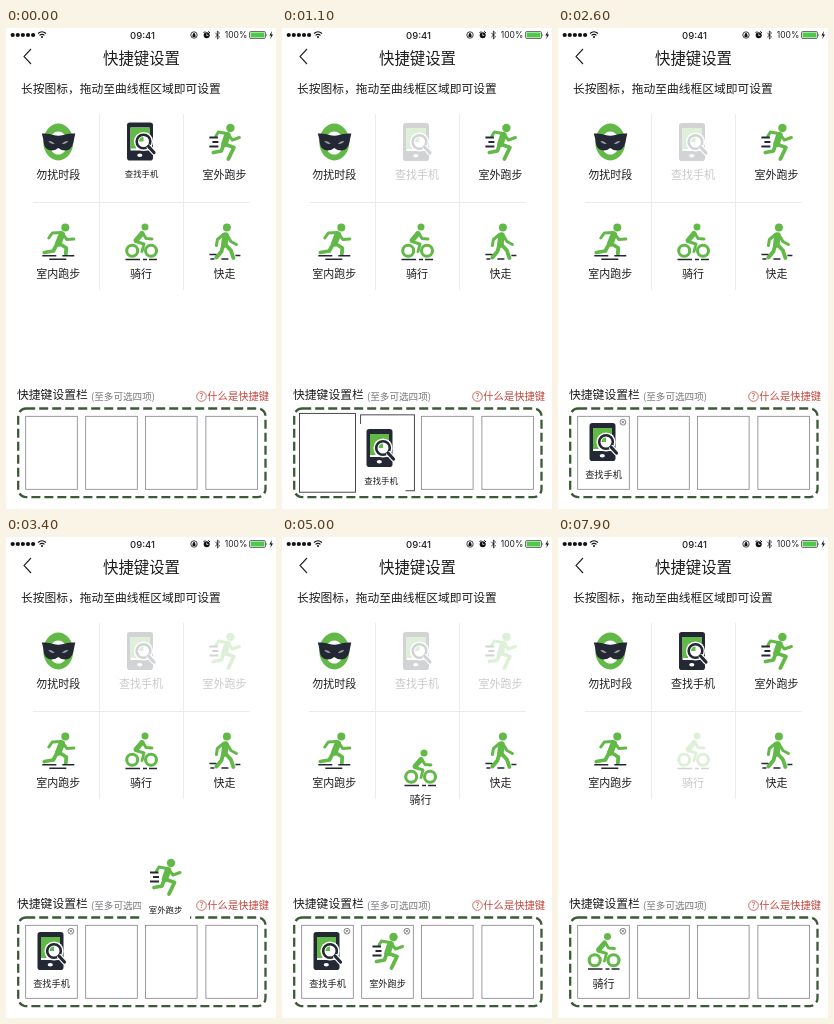
An HTML page that plays this animation: 270x481 px, repeating every 8000 ms.

```html
<!DOCTYPE html>
<html lang="zh-CN">
<head>
<meta charset="utf-8">
<title>快捷键设置</title>
<style>
html, body { margin: 0; width: 100%; height: 100%; overflow: hidden; background: #fff; }
svg { display: block; width: 100vw; height: 100vh; }
text { font-family: "Noto Sans CJK SC", "Noto Sans CJK", "Noto Sans", sans-serif; fill: #1d1d1f; }
.status { font-family: Inter, Roboto, sans-serif; }
.g { fill: #63b947; }
.d { fill: #242835; }
.w { fill: #fff; }
.gs, .ds, .ws { fill: none; stroke-linecap: round; stroke-linejoin: round; }
.gs { stroke: #63b947; }
.ds { stroke: #242835; }
.ws { stroke: #fff; }
.flat { stroke-linecap: butt; }
.faded .icon { opacity: .2; }
.faded text { fill: #c9c9c9; }
.slot { fill: none; stroke: #80808a; stroke-width: .8; }
.slot.over { stroke: #33363c; stroke-width: .9; }
</style>
</head>
<body>
<svg viewBox="0 0 270 481" preserveAspectRatio="none">
  <defs>
    <g id="mask">
      <ellipse class="g" rx="15" ry="18.500"/>
      <ellipse class="w" cy="1" rx="9" ry="11.500"/>
      <path class="d" d="M-16.500-8.500Q-9-9-5-7Q0-5.500 5-7Q9-9 17-8.500Q16-4 15 1Q13 8.500 7 8.500Q3 8.500 0 6Q-3 8.500-7 8.500Q-14 7.500-14.500 1Q-15-4-16.500-8.500Z"/>
      <path class="w" opacity=".55" d="M-10-1Q-6-1.500-3.500 2Q-8 2.500-10-1ZM10-1Q6-1.500 3.500 2Q8 2.500 10-1Z"/>
    </g>
    <g id="phone">
      <rect class="d" x="-14" y="-19" width="26" height="38" rx="2.800"/>
      <rect class="w" x="-10.500" y="-14" width="19" height="23"/>
      <path class="g" d="M-10.500-14H8.500V-8H-5V7H-10.500Z"/>
      <rect class="g" x="-8" y="-11" width="13" height="16"/>
      <circle class="w" cx="2.500" cy="0" r="9.600"/>
      <circle class="ds" cx="2.500" cy="0" r="6.800" stroke-width="2.600"/>
      <path class="g" d="M2.500-4.500A4.500 4.500 0 0 0-2 0H2.500Z"/>
      <path class="ws" d="M8.500 6L13 11" stroke-width="5.500"/>
      <path class="ds" d="M7.500 5L13 11" stroke-width="3.200"/>
      <ellipse class="w" cx="-1.200" cy="13.800" rx="2.600" ry="1.700"/>
    </g>
    <g id="outdoor">
      <circle class="g" cx="6" cy="-14" r="4.200"/>
      <path class="gs" d="M3-7L0 2" stroke-width="6.500"/>
      <path class="gs" d="M2-8.500L-6-10L-8.500-6M4-7L8-2L15-4.500" stroke-width="3"/>
      <path class="gs" d="M0 2L9.500 5.500L4 17M-1 3L-3 9L-11 10.500" stroke-width="3.800"/>
      <path class="ds flat" d="M-15-4.500H-6.500M-12 0H-6M-15 4.500H-6" stroke-width="1.900"/>
    </g>
    <g id="indoor">
      <circle class="g" cx="7" cy="-14" r="4"/>
      <path class="gs" d="M3.500-7L0 2" stroke-width="6.500"/>
      <path class="gs" d="M3-9L-6-8.500L-9.500-3.500M5-7L8.500-2L15.500-2.500" stroke-width="3"/>
      <path class="gs" d="M1 2L8 6.500L7.500 12.500M-1 2L-5 9.500L-14 11" stroke-width="3.800"/>
      <path class="ds flat" d="M-16 14.300H-2M4 14.300H16M-9 17.700H8" stroke-width="1.600"/>
    </g>
    <g id="bike">
      <circle class="gs" cx="-8.800" cy="9.300" r="5.500" stroke-width="3.100"/>
      <circle class="gs" cx="10" cy="9.300" r="5.500" stroke-width="3.100"/>
      <circle class="g" cx="4" cy="-14.500" r="3.500"/>
      <path class="gs" d="M1-8L-5-1" stroke-width="5"/>
      <path class="gs" d="M2-8L5-3L11-2.500M-5 0L3 2.500L1 10" stroke-width="2.900"/>
      <path class="ds flat" d="M-15.500 18H-1M2 18H6M8 18H16" stroke-width="1.600"/>
    </g>
    <g id="walk">
      <circle class="g" cx="2.500" cy="-14" r="4"/>
      <path class="gs" d="M1-6L0 3" stroke-width="6.500"/>
      <path class="gs" d="M-1-7L-7-2L-8 4M3-6L6.500 0L12 3" stroke-width="3"/>
      <path class="gs" d="M1 3L6.500 9L9 16.500M-1 3L-3 10L-8 16" stroke-width="3.900"/>
      <path class="ds flat" d="M-15 13H-8M-14 17.500H-10M-3 17.500H4M11 14H16" stroke-width="1.600"/>
    </g>
  </defs>
  <rect width="270" height="481" fill="#fff"/>

  <g id="bar" fill="#111">
    <path d="M32 5.500Q36 2 40 5.500M33.500 7.400Q36 5.300 38.500 7.400" fill="none" stroke="#111" stroke-width="1.100"/>
    <circle cx="36" cy="9" r="1"/>
    <circle cx="188" cy="7" r="3.200" fill="none" stroke="#111" stroke-width=".8"/>
    <path d="M186.500 6.500H189.500V9H186.500ZM187 6.500V5.300H189V6.500"/>
    <circle cx="200.700" cy="7.300" r="3"/>
    <path d="M197.500 5L199.200 3.300M204 5L202.200 3.300" stroke="#111" stroke-width="1"/>
    <path d="M200.700 5.500V7.500H202.300" fill="none" stroke="#fff" stroke-width=".7"/>
    <path d="M209.300 4.800L213.500 9L211.400 11V3L213.500 5L209.300 9.200" fill="none" stroke="#111" stroke-width=".8"/>
    <rect x="243.500" y="3.500" width="16" height="7" rx="1.500" fill="#fff" stroke="#333" stroke-width=".7"/>
    <rect x="244.600" y="4.600" width="13.800" height="4.800" rx=".6" fill="#4fc94c"/>
    <path d="M260.500 5.700V8.300Q261.800 7 260.500 5.700Z"/>
    <path d="M266 3L263.300 7.500H265L264.300 11L267 6.500H265.300Z"/>
  </g>
  <path d="M25 21L18 28.500L25 36" fill="none" stroke="#222" stroke-width="1.100"/>
  <path d="M93.500 86V262M177.500 86V262M27 174.500H244" stroke="#ebebeb" fill="none"/>
  <g id="copy"></g>
  <g id="grid"></g>
  <rect x="12.200" y="380.500" width="247.300" height="88.600" rx="8" fill="none" stroke="#3c5a37" stroke-width="2.300" stroke-dasharray="9 4"/>
  <circle cx="195.500" cy="368.500" r="4.800" fill="none" stroke="#c4473d" stroke-width=".8"/>
  <g id="slots"></g>
  <g id="tray"></g>
  <g id="drag"></g>
</svg>
<script>
const LOOP = 8000, STEP = 100;
const NS = "http://www.w3.org/2000/svg";
const $ = id => document.getElementById(id);

function add(parent, tag, attrs = {}) {
  const el = document.createElementNS(NS, tag);
  for (const k in attrs) el.setAttribute(k, attrs[k]);
  return parent.appendChild(el);
}
// y is the middle of the line
function label(parent, str, x, y, size, anchor = "middle", extra = {}) {
  const el = add(parent, "text", { x, y: y + size * .37, "font-size": size, "text-anchor": anchor, ...extra });
  el.textContent = str;
  return el;
}
function place(el, x, y) { el.setAttribute("transform", `translate(${x} ${y})`); }
function show(el, on) { el.style.display = on ? "" : "none"; }
function icon(parent, id) { return add(parent, "use", { href: "#" + id, class: "icon" }); }

const items = [
  { id: "mask", name: "勿扰时段", x: 52.3, y: 114 },
  { id: "phone", name: "查找手机", x: 135, y: 114 },
  { id: "outdoor", name: "室外跑步", x: 218.4, y: 114 },
  { id: "indoor", name: "室内跑步", x: 52.3, y: 213.5 },
  { id: "bike", name: "骑行", x: 135, y: 213.5 },
  { id: "walk", name: "快走", x: 218.4, y: 213.5 }
];
const slotX = [45.5, 105.5, 165.3, 225.7];

// drag paths: [time, x, y]; the last entry is the drop
const drags = {
  phone: [[0, 135, 113.5], [300, 128, 165], [600, 82, 335], [800, 52, 412], [1000, 82, 420],
    [1100, 98.5, 420], [1500, 106, 422], [2000, 120.5, 425], [2400, 155, 424], [2600, 162, 422]],
  outdoor: [[2800, 218, 114], [3000, 212, 145], [3200, 186, 245], [3400, 159, 340], [3600, 150, 436],
    [3800, 136, 442], [4000, 114, 428], [4200, 106, 418]],
  bike: [[4700, 135, 213.5], [5000, 138, 230.5], [5300, 146, 305], [5600, 157, 390],
    [5900, 166, 424], [6200, 166, 416]]
};
const removed = { phone: 6900, outdoor: 7500, bike: LOOP };
// slot, from, to
const hovers = [[0, 800, 1300], [1, 1100, 2200], [2, 2200, 2600], [1, 3900, 4200], [2, 5800, 6200]];

const bar = $("bar"), copy = $("copy");
for (let i = 0; i < 5; i++) add(bar, "circle", { cx: 6.7 + i * 5.1, cy: 7, r: 2.1 });
label(bar, "09:41", 136.5, 7, 9.5, "middle", { class: "status", "font-weight": 500 });
label(bar, "100%", 230, 7, 8.5, "middle", { class: "status" });
label(copy, "快捷键设置", 135.5, 30, 15.4);
label(copy, "长按图标，拖动至曲线框区域即可设置", 15, 60.5, 11.75, "start");
label(copy, "快捷键设置栏", 11, 366.7, 11.8, "start");
label(copy, "(至多可选四项)", 85, 368, 9.6, "start", { style: "fill:#77777c" });
label(copy, "什么是快捷键", 201.3, 368.6, 10.3, "start", { style: "fill:#c4473d" });
label(copy, "?", 195.5, 368.5, 8, "middle", { style: "fill:#c4473d" });

const slots = slotX.map(() => add($("slots"), "rect"));

for (const it of items) {
  it.home = add($("grid"), "g");
  place(it.home, it.x, it.y);
  icon(it.home, it.id);
  label(it.home, it.name, 0, 32.7, 11);
  it.path = drags[it.id];
  if (!it.path) continue;

  const short = it.name.length < 3;
  it.tile = add($("drag"), "g");
  add(it.tile, "rect", { x: -24, y: -24, width: 49, height: 69, fill: "#fff" });
  icon(it.tile, it.id);
  label(it.tile, it.name, .6, 32.5, short ? 11 : 8.4);

  it.docked = add($("tray"), "g");
  icon(it.docked, it.id);
  label(it.docked, it.name, 0, 32.5, short ? 11 : 9.2);
  add(it.docked, "circle", { cx: 19.4, cy: -19.8, r: 2.9, fill: "#fff", stroke: "#555", "stroke-width": .7 });
  add(it.docked, "path", { d: "M18.1-21.1l2.6 2.6m0-2.6l-2.6 2.6", stroke: "#555", "stroke-width": .7 });
}

function along(path, t) {
  let i = 1;
  while (i < path.length - 1 && path[i][0] < t) i++;
  const a = path[i - 1], b = path[i], k = (t - a[0]) / (b[0] - a[0]);
  return [a[1] + (b[1] - a[1]) * k, a[2] + (b[2] - a[2]) * k];
}

function draw(t) {
  let next = 0;
  for (const it of items) {
    if (!it.path) continue;
    const start = it.path[0][0], drop = it.path[it.path.length - 1][0];
    const moving = t >= start && t < drop;
    const docked = t >= drop && t < removed[it.id];
    let near = false;
    show(it.tile, moving);
    show(it.docked, docked);
    if (moving) {
      const [x, y] = along(it.path, t);
      place(it.tile, x, y);
      near = Math.hypot(x - it.x, y - it.y) < 40;
    }
    if (docked) place(it.docked, slotX[next++], 414);
    show(it.home, !near);
    it.home.setAttribute("class", moving || docked ? "faded" : "");
  }
  slots.forEach((el, i) => {
    // a hovered slot swells over 200 ms
    const grow = Math.max(0, ...hovers.map(([s, from, to]) =>
      s === i && t >= from && t < to ? Math.min(1, (t - from + STEP) / 200) : 0));
    const gx = grow * 2.2, gy = grow * 2.9;
    el.setAttribute("class", grow ? "slot over" : "slot");
    el.setAttribute("x", slotX[i] - 25.8 - gx);
    el.setAttribute("y", 388.3 - gy);
    el.setAttribute("width", 51.6 + gx * 2);
    el.setAttribute("height", 73 + gy * 2);
  });
}

const begin = performance.now();
function tick() {
  const t = (performance.now() - begin) % LOOP;
  draw(Math.floor(t / STEP) * STEP);
  requestAnimationFrame(tick);
}
tick();
</script>
</body>
</html>
```
